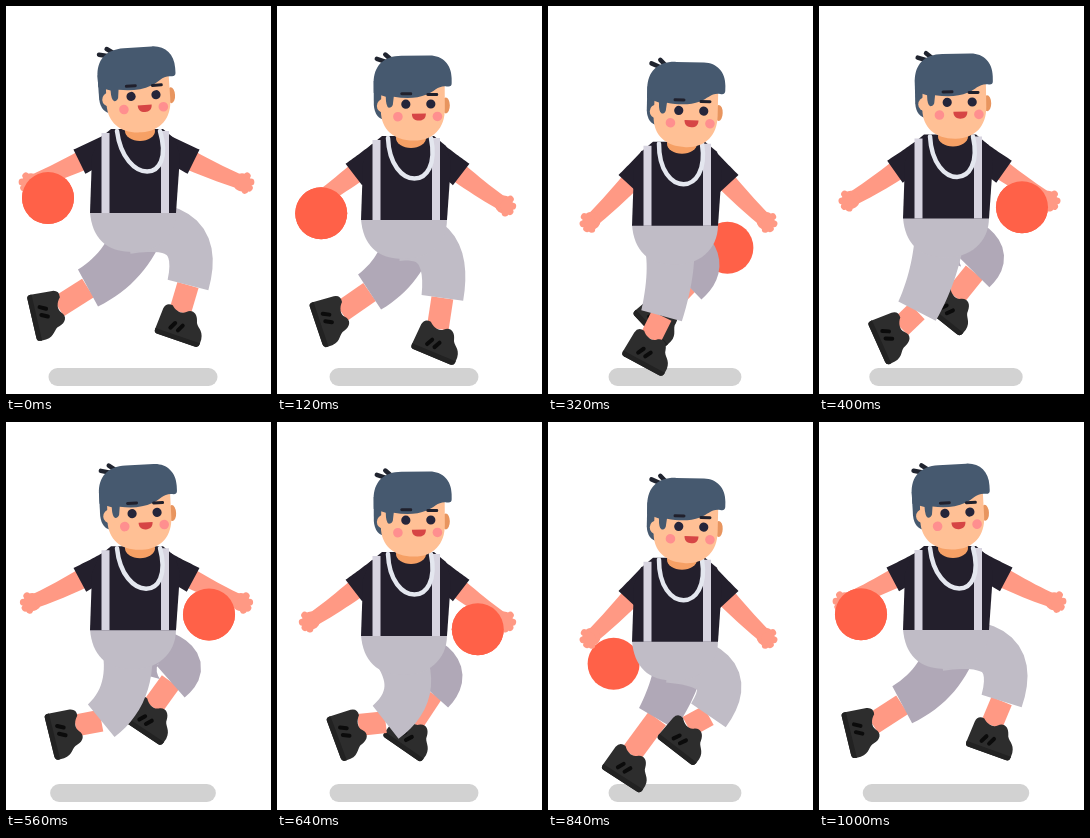
Animation of 265x388 px, one loop 1040 ms. Source, as an HTML page:

```html
<!DOCTYPE html>
<html lang="en">
<head>
<meta charset="utf-8">
<title>Dribbling boy</title>
<style>
  html, body { margin: 0; width: 100%; height: 100%; overflow: hidden; background: #fff; }
  svg { display: block; width: 100vw; height: 100vh; }
  .skin { fill: #ff9984; }
  .face { fill: #ffc095; }
  .hair { fill: #46596f; }
  .shin { stroke: #ff9984; stroke-width: 22; }
  .shirt { fill: #231f2c; }
  .near { fill: #c0bcc6; }
  .far { fill: #b0a8b7; }
  .ball { fill: #ff6148; }
  .strap { stroke: #d7d4e0; stroke-width: 8; }
  .line { fill: none; stroke-linecap: round; }
</style>
</head>
<body>
<svg viewBox="0 0 265 388">
  <defs>
    <g id="shoe">
      <path fill="#2d2d2d" d="M-17 2Q-16-5-9-4C-5 0 2 2 6-2C11-7 17-4 19 3C20 9 28 9 29 19V24Q29 28 25 28H-15Q-18 28-18 24Z"/>
      <path fill="#222" d="M-18 23H29V24Q29 28 25 28H-15Q-18 28-18 24Z"/>
      <path class="line" stroke="#0b0b0b" stroke-width="4" d="M-4 18L-1 12M4 18L7 12"/>
    </g>
    <g id="hand">
      <circle class="skin" r="9"/>
      <path class="line" stroke="#ff9984" stroke-width="7" d="M0 0L2-8M0 0L8-4M0 0L9 2M0 0L6 6"/>
    </g>
  </defs>

  <rect id="shadow" y="362" height="18" rx="9" fill="#d2d2d2"/>
  <circle id="ballBack" class="ball" r="26"/>

  <path id="farShin" class="shin"/>
  <use id="farShoe" href="#shoe"/>
  <path id="farPants" class="far"/>

  <path id="leftArm" class="skin"/><use id="leftHand" href="#hand"/>
  <path id="rightArm" class="skin"/><use id="rightHand" href="#hand"/>
  <path id="leftSleeve" class="shirt"/><path id="rightSleeve" class="shirt"/>

  <path id="nearShin" class="shin"/>
  <use id="nearShoe" href="#shoe"/>
  <path id="nearPants" class="near"/>

  <g id="torso">
    <path class="near" d="M84 206H170C170 232 150 246 127 246C100 246 86 232 84 206Z"/>
    <path class="shirt" d="M105 123H157L169 133L174 150L170 207H84L86 150L93 133Z"/>
    <path class="strap" d="M99.5 127V207M159 125V207"/>
    <ellipse cx="134" cy="125" rx="15" ry="10" fill="#f6a065"/>
    <path id="chain" class="line" stroke="#e4e7ef" stroke-width="4.5"/>
  </g>

  <g id="head">
    <path id="tuft" class="line" stroke="#20242f" stroke-width="4.5" d="M106 68L118 74M115 65L122 73"/>
    <path class="hair" d="M102 92V116Q103 130 114 131L120 100Z"/>
    <ellipse cx="174" cy="117" rx="4" ry="8" fill="#e8955f"/>
    <path class="face" d="M110 90H173V120C173 140 161 152 142 152C122 152 109 141 109 122Z"/>
    <circle class="face" cx="112" cy="117" r="7"/>
    <path class="hair" d="M102 104V94C102 77 112 67 130 67H158C171 67 180 76 180 90V95Q180 99 175 98C166 97 163 103 155 106C145 110 134 110 122 108L121 116Q120 119 117 119Q114 118 114 108Z"/>
    <path class="line" stroke="#20202c" stroke-width="3" d="M130 105H139M156 106H165"/>
    <g fill="#25253a"><circle cx="134" cy="115.5" r="4.6"/><circle cx="159" cy="115.5" r="4.6"/></g>
    <g fill="#ff8f8f"><circle cx="126" cy="128" r="4.8"/><circle cx="165.500" cy="128" r="4.8"/></g>
    <path fill="#d64545" d="M140 125H154C154 130 151 132 147 132S140 130 140 125Z"/>
  </g>

  <circle id="ballFront" class="ball" r="26"/>
</svg>
<script>
const LOOP = 1040, HALF = LOOP / 2, STEP = 40, LANDING = 240;
const ARM = 86;
const el = {};
document.querySelectorAll('[id]').forEach(e => el[e.id] = e);
const set = (id, name, value) => el[id].setAttribute(name, value);
const mix = (a, b, u) => a + (b - a) * u;
const smooth = u => { u = Math.min(1, Math.max(0, u)); return u * u * (3 - 2 * u); };

// Tapered tube along a quadratic curve, up to the fraction end.
function limb(a, b, c, w0, w1, end = 1) {
  const one = [], two = [], count = 14;
  for (let i = 0; i <= count; i++) {
    const u = end * i / count, v = 1 - u;
    const pos = k => v * v * a[k] + 2 * u * v * b[k] + u * u * c[k];
    const dir = k => v * (b[k] - a[k]) + u * (c[k] - b[k]);
    const r = mix(w0, w1, i / count) / 2 / Math.hypot(dir(0), dir(1));
    const nx = -dir(1) * r, ny = dir(0) * r;
    one.push([pos(0) + nx, pos(1) + ny]);
    two.unshift([pos(0) - nx, pos(1) - ny]);
  }
  return 'M' + one.concat(two).map(p => p.map(q => q.toFixed(2)).join(' ')).join('L') + 'Z';
}

// Stride rules: c swings forward and back, s is positive on the ground, p peaks when planted.
const strides = {
  near: (c, s, p) => ({
    hip: [121, 223],
    knee: [160 + 39 * c - 22 * s, 242 - 30 * c],
    hem: [137 + 45 * c - 8 * s, 289 - 10 * c + 5 * s],
    ankle: [121 + 53 * c, 306 + 15 * s],
    angle: 48 - 29 * c - 45 * p * p
  }),
  far: (c, s, p) => ({
    hip: [132, 226],
    knee: [154 + 37 * c + 6 * s - 24 * p, 249 - 14 * c],
    hem: [124 + 42 * c, 270 - 12 * c + 12 * p],
    ankle: [100 + 48 * c, 292 - 9 * c + 30 * p],
    angle: 55 - 22 * c - 45 * p * p
  })
};

function leg(name, turn, drop) {
  const s = Math.sin(turn);
  const pose = strides[name](Math.cos(turn), s, Math.max(0, s) ** 3);
  const [hip, knee, hem, ankle] = [pose.hip, pose.knee, pose.hem, pose.ankle].map(([x, y]) => [x, y + drop]);
  set(name + 'Pants', 'd', limb(hip, knee, hem, 50, 42));
  set(name + 'Shin', 'd', `M${hem}L${ankle}`);
  set(name + 'Shoe', 'transform', `translate(${ankle}) rotate(${pose.angle})`);
}

function arm(name, shoulder, side, angle) {
  const a = angle * Math.PI / 180;
  const hand = [shoulder[0] + side * ARM * Math.cos(a), shoulder[1] + ARM * Math.sin(a)];
  const elbow = [mix(shoulder[0], hand[0], .5), mix(shoulder[1], hand[1], .5) + 4];
  set(name + 'Arm', 'd', limb(shoulder, elbow, hand, 23, 14));
  set(name + 'Sleeve', 'd', limb(shoulder, elbow, hand, 24, 27, .38));
  set(name + 'Hand', 'transform', `translate(${hand}) scale(${side} 1) rotate(${angle})`);
}

function draw(t) {
  // dip: 0 at the top of each hop, 1 at the landing
  const p = t % HALF;
  const dip = (p < LANDING ? p / LANDING : (HALF - p) / (HALF - LANDING)) ** 1.65;
  const lean = dip ** .7, drop = 22 * dip;
  const turn = t / LOOP * 2 * Math.PI;

  const width = mix(169, 106, dip);
  set('shadow', 'x', 127 - width / 2);
  set('shadow', 'width', width);

  set('torso', 'transform', `translate(0 ${drop})`);
  const sway = mix(144, 133, lean);
  set('chain', 'd', `M111 125C${sway - 26} 179 ${sway + 26} 179 154 125`);
  set('head', 'transform',
    `translate(${9.5 * (lean - 1)} ${25.5 * (dip - 1)}) rotate(${mix(-4, 4, lean)} 141 108)`);
  set('tuft', 'transform', `rotate(${mix(-14, 0, lean)} 120 74)`);

  leg('near', turn, drop);
  leg('far', turn + Math.PI, drop);

  const reach = mix(25, 62, dip);
  arm('left', [103, 140 + drop], -1, reach);
  arm('right', [158, 140 + drop], 1, reach);

  // The ball crosses between the hands during each hop.
  const cross = smooth((p - 100) / 290);
  for (const id of ['ballBack', 'ballFront']) {
    set(id, 'cx', mix(42, 203, t < HALF ? cross : 1 - cross));
    set(id, 'cy', mix(192, 343, dip * dip));
  }
  set('ballFront', 'visibility', dip < .4 ? 'visible' : 'hidden');
}

const start = performance.now();
function tick() {
  const t = (performance.now() - start) % LOOP;
  draw(Math.floor(t / STEP) * STEP);
  requestAnimationFrame(tick);
}
tick();
</script>
</body>
</html>
```
